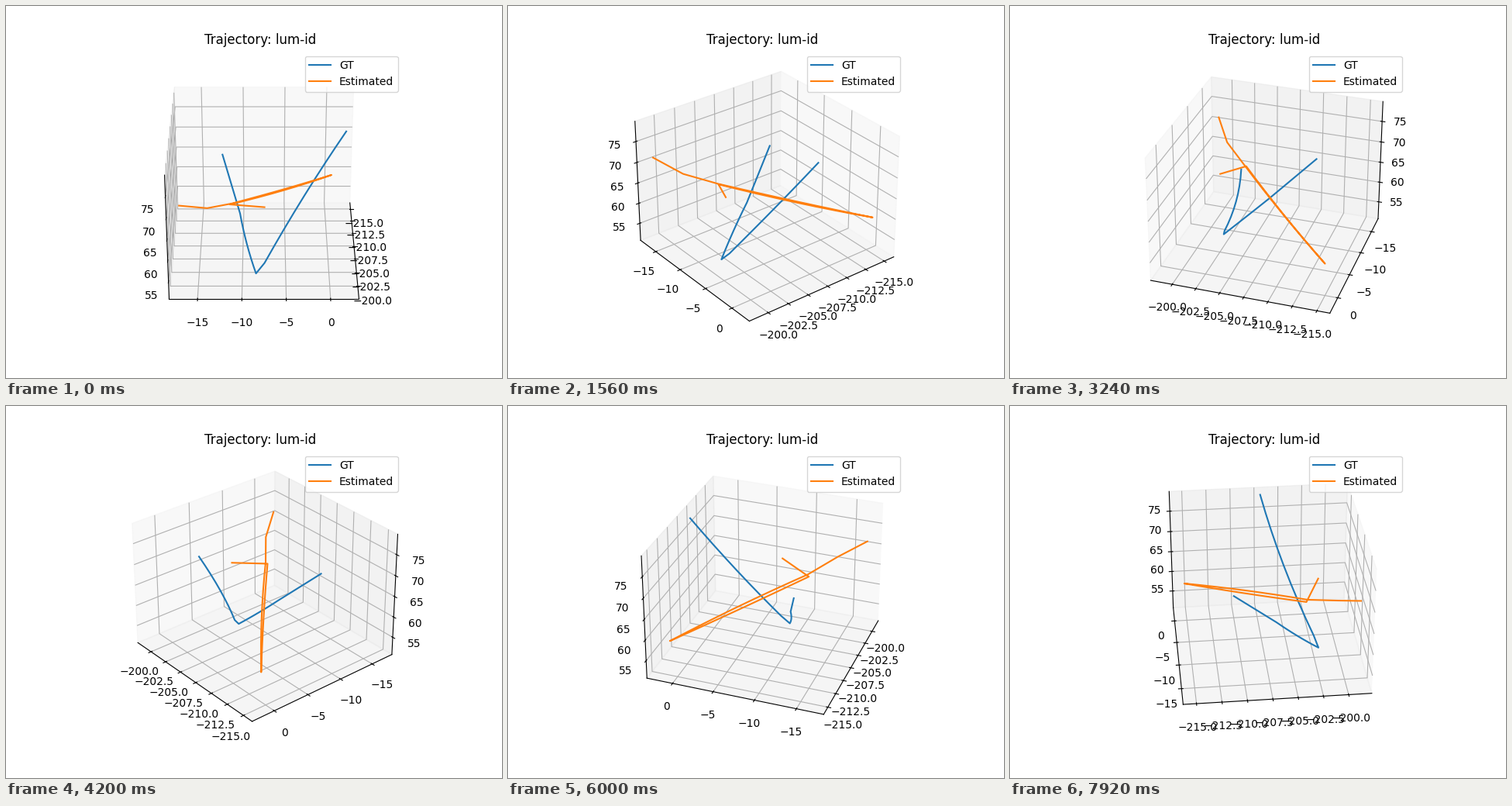
These frames come from a looping animation (640 px wide and 480 px high, 8000 ms). A matplotlib script:

```python
import numpy as np
import matplotlib.pyplot as plt
from matplotlib.animation import FuncAnimation

INTERVAL = 40       # ms per tick
FRAMES = 200        # 8000 ms in all
TICKS_PER_TURN = 3  # the camera steps every 120 ms
STEP = 4            # degrees per camera step


def leg(start, end, bow=(0, 0, 0)):
    """Line from start to end, pushed aside by bow at its middle."""
    s = np.linspace(0, 1, 9)[:, None]
    start, end, bow = map(np.array, (start, end, bow))
    return start + (end - start) * s + 4 * bow * s * (1 - s)


def path(points, bows):
    """Join the points; bows maps a leg's index to its sideways bow."""
    pairs = zip(points, points[1:])
    return np.vstack([leg(a, b, bows.get(i, (0, 0, 0)))
                      for i, (a, b) in enumerate(pairs)])


ground_truth = path(
    [(-210.81, -12.40, 69.36), (-206.40, -10.30, 60.23),
     (-201.87, -8.43, 51.25), (-202.27, -7.45, 53.30),
     (-206.97, 1.84, 79.19)],
    {1: (0, -0.14, -0.1), 3: (-0.34, -0.1, 0)})

estimated = path(
    [(-198.88, -16.84, 71.40), (-200.71, -13.85, 68.55),
     (-203.40, -11.22, 66.31), (-215.12, 0.75, 59.30),
     (-203.53, -11.39, 65.96), (-201.91, -7.45, 67.30)],
    {2: (0, 0.27, 0), 3: (0, 0.13, -0.28)})

fig = plt.figure(figsize=(6.4, 4.8), dpi=100)
ax = fig.add_subplot(projection="3d")
ax.plot(*ground_truth.T, label="GT")
ax.plot(*estimated.T, label="Estimated")

# Data margin on x and y only, then the usual 1/48 around the box.
everything = np.vstack([ground_truth, estimated])
low, high = everything.min(axis=0), everything.max(axis=0)
margin = np.array([0.05, 0.05, 0])
pad = (high - low) * (margin + (1 + 2 * margin) / 48)
ax.set(xlim=(low[0] - pad[0], high[0] + pad[0]),
       ylim=(low[1] - pad[1], high[1] + pad[1]),
       zlim=(low[2] - pad[2], high[2] + pad[2]))

ax.set_title("Trajectory: lum-id")
ax.legend(loc="upper right")


def update(i):
    ax.view_init(elev=30, azim=STEP * (i // TICKS_PER_TURN))
    return []


anim = FuncAnimation(fig, update, frames=FRAMES, interval=INTERVAL,
                     repeat=True, repeat_delay=0)
plt.show()
```
